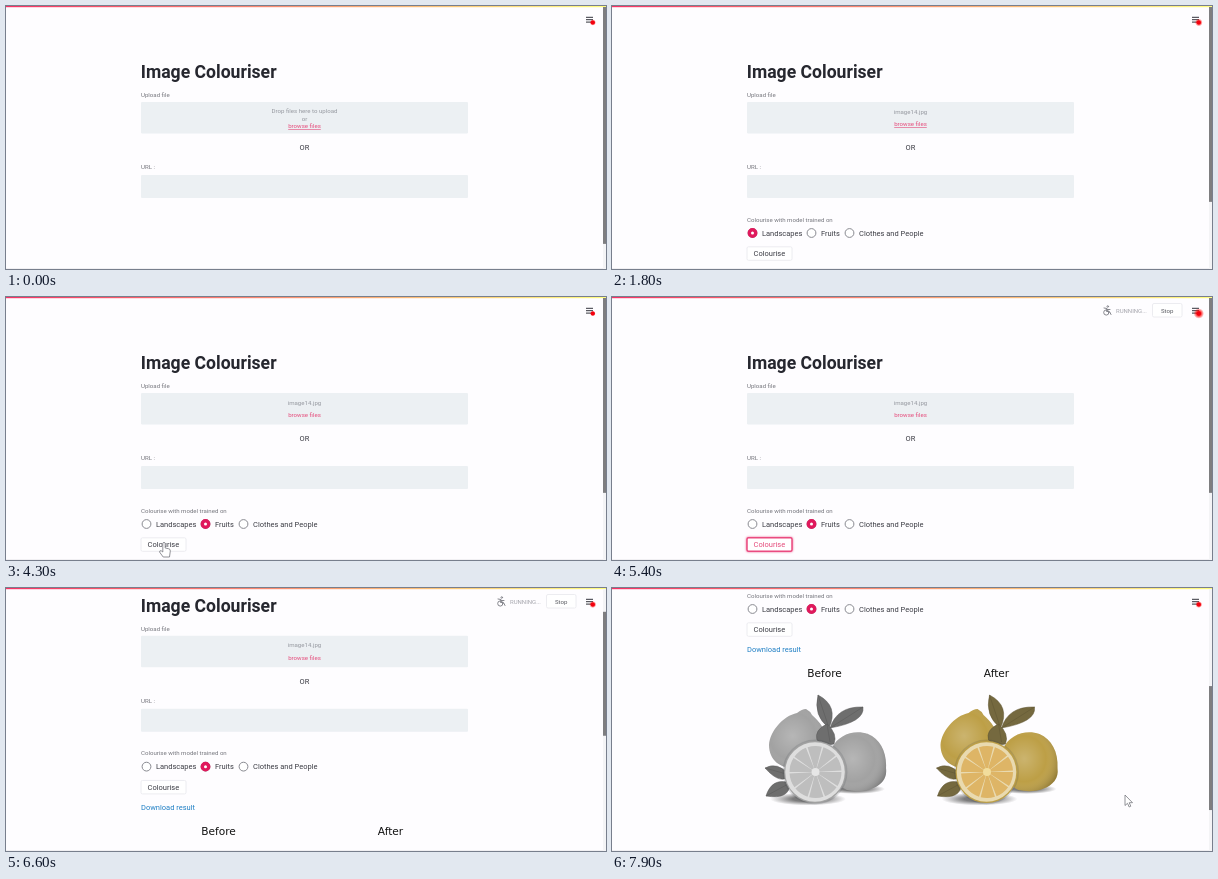
Animation, 600 px wide and 263 px high, one loop 8 s. Source, as an HTML page:

```html
<!DOCTYPE html>
<html lang="en">
<head>
<meta charset="utf-8">
<title>Image Colouriser</title>
<style>
html, body { margin: 0; width: 100%; height: 100%; overflow: hidden; background: #fefdff; }
svg { display: block; width: 100vw; height: 100vh; font: 7.5px Roboto, sans-serif; fill: #3b3c44; }
.title { font-size: 17.6px; font-weight: 700; fill: #26272f; }
.small { font-size: 6.1px; fill: #74757c; }
.hint { font-size: 6.1px; fill: #94979e; }
.mid { text-anchor: middle; }
.link { font-size: 6.1px; fill: #e54a7a; }
.field { fill: #ecf0f3; }
.box { fill: #fff; stroke: #e8e8ed; stroke-width: .8; }
.focus { stroke: #ea4b80; stroke-width: 1.5; filter: drop-shadow(0 0 .8px #f06a96); }
.plot { font: 10.6px "DejaVu Sans", sans-serif; fill: #111; text-anchor: middle; }
.ring { fill: #fff; stroke: #898a91; stroke-width: 1; }
.icon { fill: none; stroke: #85868d; stroke-width: 1; stroke-linecap: round; stroke-linejoin: round; }
.cursor { fill: #fff; stroke: #77787e; stroke-width: .8; stroke-linejoin: round; }
.grey { --skin: #a2a2a2; --rind: #dedede; --flesh: #bebebe; --leaf: #6e6e6e; --vein: #585858; --core: #e6e6e6; }
.colour { --skin: #bd9f46; --rind: #e9dab0; --flesh: #deb566; --leaf: #75693f; --vein: #5f5433; --core: #f2dd9c; }
</style>
</head>
<body>
<svg viewBox="0 0 600 263" preserveAspectRatio="none">
  <defs>
    <linearGradient id="rainbow">
      <stop offset="0" stop-color="#f63366"/><stop offset="1" stop-color="#fffd80"/>
    </linearGradient>
    <radialGradient id="glow">
      <stop offset=".3" stop-color="#f00"/><stop offset="1" stop-color="#f00" stop-opacity="0"/>
    </radialGradient>
    <radialGradient id="shade" cx=".4" cy=".45" r=".65">
      <stop offset="0" stop-color="#fff" stop-opacity=".22"/>
      <stop offset=".6" stop-color="#fff" stop-opacity="0"/>
      <stop offset="1" stop-opacity=".22"/>
    </radialGradient>
    <radialGradient id="floor">
      <stop offset=".4" stop-color="#444" stop-opacity=".7"/><stop offset="1" stop-color="#444" stop-opacity="0"/>
    </radialGradient>
    <clipPath id="loaded"><rect id="reveal" x="130" y="300" width="340"/></clipPath>
    <path id="left" d="M185 125Q190 121 194 121Q198 123 200 127C207 133 215 143 216 155C216 171 203 181 186 181C168 181 157 172 157 157C158 143 171 128 185 125Z"/>
    <path id="right" d="M220 160C226 147 242 141 256 146C268 151 275 164 274 180Q275 188 271 193C264 202 249 205 235 202C222 196 215 176 220 160Z"/>
    <g id="fruit">
      <ellipse cx="196" cy="211" rx="38" ry="6.500" fill="url(#floor)"/>
      <ellipse cx="243" cy="201" rx="30" ry="5" fill="url(#floor)"/>
      <g fill="var(--skin)"><use href="#left"/><use href="#right"/></g>
      <g fill="url(#shade)"><use href="#left"/><use href="#right"/></g>
      <g fill="var(--leaf)" stroke="var(--vein)" stroke-width=".5">
        <path d="M217 140Q201 128 206 107Q227 118 217 140L206 107"/>
        <path d="M218 140Q225 118 251 119Q253 134 218 140L251 119"/>
        <path d="M215 136Q202 142 205 152Q213 158 222 156Q226 146 215 136L218 154"/>
        <path d="M153 180Q165 173 178 187Q169 198 153 180L178 187"/>
        <path d="M154 208Q160 189 178 195Q178 212 154 208L178 195"/>
      </g>
      <circle cx="203" cy="184" r="32.500" opacity=".15"/>
      <circle cx="203" cy="184" r="31" fill="var(--skin)"/>
      <circle cx="203" cy="184" r="29.800" fill="var(--rind)"/>
      <circle cx="203.500" cy="184" r="14.500" pathLength="10" fill="none" stroke="var(--flesh)" stroke-width="23" stroke-dasharray=".9 .1"/>
      <circle cx="203.500" cy="184" r="4" fill="var(--core)"/>
    </g>
  </defs>

  <rect width="600" height="263" fill="#fefdff"/>
  <g id="page">
    <text class="title" x="134.800" y="72.300">Image Colouriser</text>
    <text class="small" x="135" y="91">Upload file</text>
    <rect class="field" x="135" y="96" width="327" height="31.500" rx="1"/>
    <g id="empty" class="hint mid">
      <text x="298.500" y="107">Drop files here to upload</text>
      <text x="298.500" y="114.500">or</text>
    </g>
    <text id="file" class="hint mid" x="298.500" y="107.700">image14.jpg</text>
    <text id="browse" class="link mid" x="298.500">browse files</text>
    <text class="mid" x="298.500" y="144">OR</text>
    <text class="small" x="135" y="163.300">URL :</text>
    <rect class="field" x="135" y="169" width="327" height="23" rx="1"/>
    <g id="form">
      <text class="small" x="135" y="215.700">Colourise with model trained on</text>
      <circle class="ring" cx="140.500" cy="227" r="4.400"/>
      <circle class="ring" cx="199.500" cy="227" r="4.400"/>
      <circle class="ring" cx="237.500" cy="227" r="4.400"/>
      <circle id="pick" cy="227" r="3.200" fill="#fff" stroke="#e0195c" stroke-width="3.400"/>
      <text x="150" y="229.800">Landscapes</text>
      <text x="209" y="229.800">Fruits</text>
      <text x="247" y="229.800">Clothes and People</text>
      <rect id="button" x="135" y="240.800" width="45" height="13.500" rx="1.500"/>
      <text id="label" x="141.500" y="250.200">Colourise</text>
    </g>
    <text id="download" x="135" y="270.300" fill="#1f7fc4">Download result</text>
    <g id="result">
      <text class="plot" x="212.500" y="295">Before</text>
      <text class="plot" x="384.500" y="295">After</text>
      <g clip-path="url(#loaded)">
        <use class="grey" href="#fruit" y="206"/>
        <use class="colour" href="#fruit" x="171.500" y="206"/>
      </g>
    </g>
  </g>

  <rect y="262" width="597" height="1" fill="#f1f0f3"/>
  <rect width="600" height="1.200" fill="url(#rainbow)"/>
  <rect x="597" y="1" width="3" height="262" fill="#f4f4f6"/>
  <rect id="thumb" x="597" width="3" fill="#7e7e80"/>
  <g id="status">
    <g id="chair" class="icon">
      <circle cx="495.800" cy="9.500" r=".8"/>
      <path d="M492 11L495 11.500L494.500 14.500H497.500L499 17.500M495 12.500H498"/>
      <circle cx="494.300" cy="15.500" r="2.600"/>
    </g>
    <g id="runner" class="icon">
      <circle cx="496" cy="9" r=".8"/>
      <path d="M491.500 13L493 11.300L495.500 11.500L494 14.500L497 16V18.500M495.500 11.500L496.800 13.300L499 13.500M494 14.500L492.500 16.500L490.500 17"/>
    </g>
    <text x="504" y="16.400" font-size="6" fill="#a3a4ab">RUNNING...</text>
    <rect class="box" x="540.500" y="6.500" width="29.500" height="13.500" rx="1.500"/>
    <text x="555.200" y="15.500" class="mid" font-size="6.100" fill="#5a5b62">Stop</text>
  </g>
  <path d="M580 11.300h7M580 13.700h7M580 16.100h7" stroke="#33343c"/>
  <circle id="halo" cx="586.800" cy="16.500" fill="url(#glow)"/>
  <circle cx="586.800" cy="16.500" r="2.100" fill="#f3000f"/>
  <path id="hand" class="cursor" d="M-1.200 0Q0-1.500 1.200 0V5L4.500 5.700Q6.500 6 6.300 8L5.500 14H-.8L-4.500 9Q-4.500 7-2.500 8L-1.200 9Z"/>
  <path id="arrow" class="cursor" d="M0 0V10.500L2.500 8.300L4.200 12L5.800 11.200L4.200 7.700H7.500Z"/>
</svg>
<script>
const el = {};
document.querySelectorAll('[id]').forEach(e => el[e.id] = e);
const set = (id, attrs) => { for (const k in attrs) el[id].setAttribute(k, attrs[k]); };
const show = (id, on) => set(id, { visibility: on ? 'visible' : 'hidden' });
const within = (t, a, b) => t >= a && t < b;

// Eased value at time t through [time, value] stops
function track(t, stops) {
  let [t0, v0] = stops[0];
  for (const [t1, v1] of stops) {
    if (t < t1) {
      const p = Math.max(0, (t - t0) / (t1 - t0));
      return v0 + (v1 - v0) * p * p * (3 - 2 * p);
    }
    [t0, v0] = [t1, v1];
  }
  return v0;
}

const scrollStops = [[5900, 0], [6300, 41], [6550, 41], [6950, 206]];
const handX = [[1900, 302], [2800, 201], [3700, 201], [4300, 158]];
const handY = [[1900, 116], [2800, 226], [3700, 226], [4300, 246]];
const arrowX = [[7500, 545], [7800, 513]];
const arrowY = [[7500, 180], [7800, 207]];

function draw(t) {
  const uploaded = t >= 1100, ready = t >= 1400, plotted = t >= 6550;
  const focused = within(t, 4700, 5700);
  const scroll = track(t, scrollStops);
  set('page', { transform: `translate(0 ${-scroll})` });

  show('empty', !uploaded);
  show('file', uploaded);
  set('browse', { y: uploaded ? 120.2 : 122, 'text-decoration': t < 2100 ? 'underline' : 'none' });
  show('form', ready);
  set('pick', { cx: t < 3500 ? 140.5 : 199.5 });
  set('button', { class: focused ? 'box focus' : 'box' });
  set('label', { class: focused ? 'pressed' : '', fill: focused ? '#e54a7a' : '#3b3c44' });
  show('download', t >= 5750);
  show('result', plotted);
  set('reveal', { height: t < 7400 ? 44.5 : 140 });

  const height = plotted ? 558 : t >= 5750 ? 374 : ready ? 355 : 292;
  set('thumb', { y: 1 + scroll * 263 / height, height: 263 * 263 / height });

  const running = within(t, 1200, 1600) || within(t, 3700, 4300) || within(t, 4900, 7000);
  const step = Math.floor(t / 300) % 2;
  show('status', running);
  show('chair', running && !step);
  show('runner', running && step);
  set('halo', { r: 4.1 + 1.3 * Math.cos((t / 2000 - .62) * 2 * Math.PI) });

  show('hand', within(t, 1900, 5000));
  set('hand', { transform: `translate(${track(t, handX)} ${track(t, handY)})` });
  show('arrow', t >= 7500);
  set('arrow', { transform: `translate(${track(t, arrowX)} ${track(t, arrowY)})` });
}

const start = performance.now();
function tick() {
  draw((performance.now() - start) % 8000);
  requestAnimationFrame(tick);
}
tick();
</script>
</body>
</html>
```
